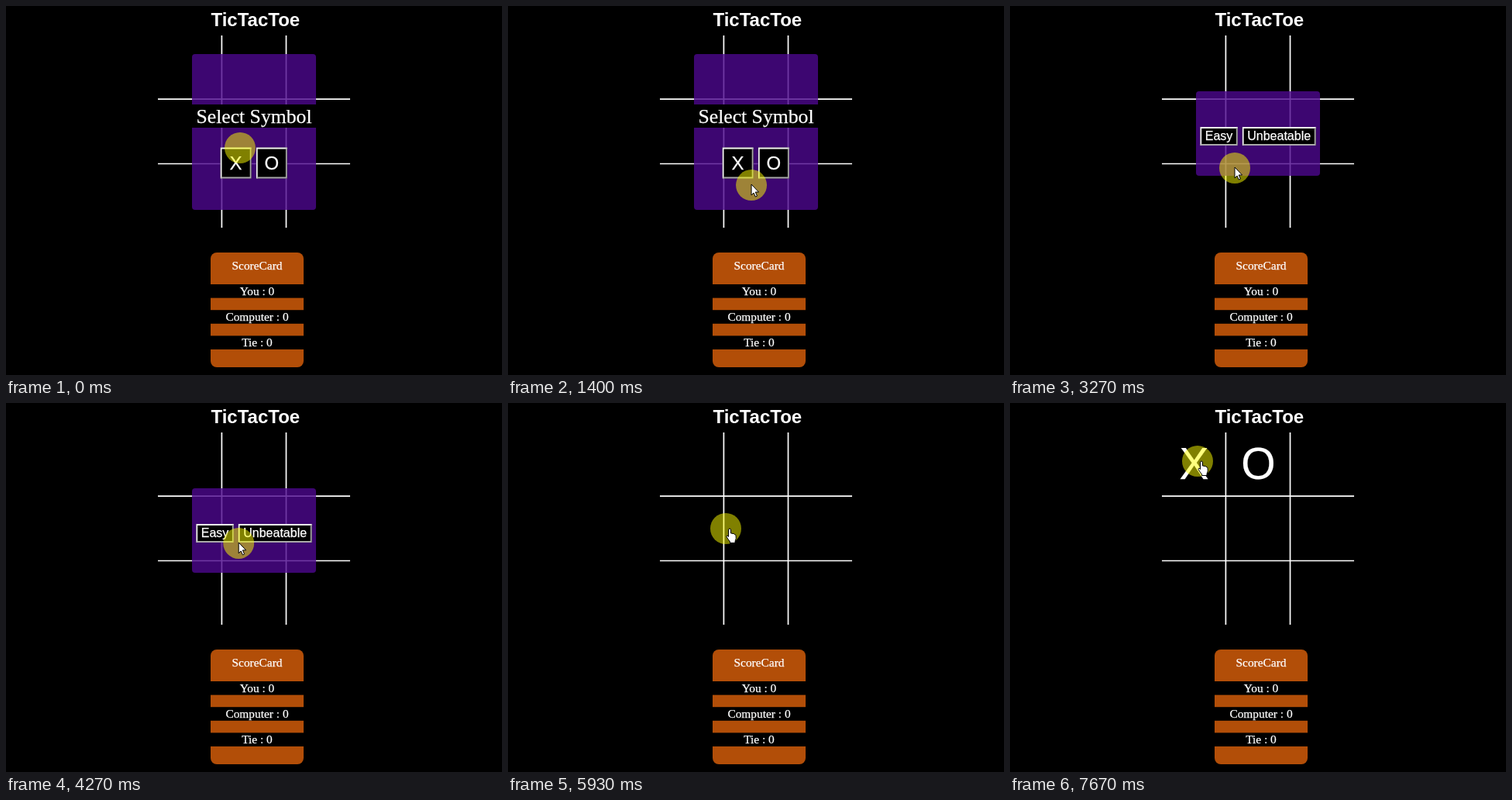
An HTML page for the animation above (8 s loop, 640 by 476 pixels).

```html
<!DOCTYPE html>
<html lang="en">
<head>
<meta charset="utf-8">
<title>TicTacToe</title>
<style>
  html, body { margin: 0; width: 100%; height: 100%; overflow: hidden; background: #000; }
  svg { display: block; width: 640px; height: 476px; }
  text { fill: #fff; stroke: #fff; stroke-width: .25; text-anchor: middle; font-family: "Liberation Sans", Arial, sans-serif; }
  .title { font-size: 24px; font-weight: bold; stroke: none; }
  .serif { font-family: "Liberation Serif", "Times New Roman", serif; }
  .panel { fill: rgba(77, 8, 142, .8); }
  .bevel { fill: none; stroke-width: 1.8; }
  .cursor { fill: #fff; stroke: #000; stroke-linejoin: round; }
  #marks { font-size: 57px; }
  #score { font-size: 15.4px; }
</style>
</head>
<body>
<svg viewBox="0 0 640 476">
  <rect width="640" height="476"/>
  <text class="title" x="321.8" y="26">TicTacToe</text>
  <path d="M278.4 38V286M361.5 38V286M196 120.2H444M196 203.5H444" stroke="#fff" stroke-width="1.7"/>
  <g id="marks">
    <text x="237.5" y="98">X</text>
    <text x="320.5" y="98">O</text>
  </g>
  <g id="symbolPanel">
    <rect class="panel" x="240" y="62" width="160" height="201" rx="4"/>
    <rect x="240" y="127" width="160" height="30"/>
    <text class="serif" x="320" y="151" font-size="25.7">Select Symbol</text>
  </g>
  <g id="levelPanel">
    <rect class="panel" x="240" y="110" width="160" height="109" rx="4"/>
  </g>
  <g id="score">
    <rect x="264" y="318" width="120" height="148" rx="8" fill="#b24e08"/>
    <text class="serif" x="324" y="340">ScoreCard</text>
  </g>
  <g id="pointer">
    <circle r="20" fill="#ff0" fill-opacity=".5"/>
    <path id="arrow" class="cursor" d="M0-1V13L3 10 5.200 15 7.400 14 5.200 9H9.500Z"/>
    <path id="hand" class="cursor" d="M3.500 2Q3.500 0 5 0T6.500 2V6Q11 6 13 8.500Q14 13 12 16.500V18.500H5.500V17Q3 14 1 10.500Q1 9 2.200 9L3.500 10.500Z"/>
  </g>
</svg>
<script>
const LOOP = 8000, TICK = 1000 / 15;
const LEVEL_AT = 3060, PLAY_AT = 5860, MARK_AT = 7460;
const el = id => document.getElementById(id);
const add = (id, markup) => el(id).insertAdjacentHTML('beforeend', markup);
const show = (id, on) => el(id).setAttribute('visibility', on ? 'visible' : 'hidden');

const symbolButton = { panel: 'symbolPanel', y: 182.5, w: 40, h: 40, size: 24, baseline: 211 };
const levelButton = { panel: 'levelPanel', y: 156, h: 24, size: 16, baseline: 173 };
const buttons = [
  { ...symbolButton, label: 'X', x: 276.6 },
  { ...symbolButton, label: 'O', x: 322.8 },
  { ...levelButton, label: 'Easy', x: 245.3, w: 48.5 },
  { ...levelButton, label: 'Unbeatable', x: 299.7, w: 95 }
];

for (const { panel, label, x, y, w, h, size, baseline } of buttons) {
  add(panel, `<rect x="${x}" y="${y}" width="${w}" height="${h}"/>
    <path class="bevel" d="M${x + 1} ${y + h}v${1 - h}h${w - 1}" stroke="#f4f4f4"/>
    <path class="bevel" d="M${x + 1} ${y + h - 1}h${w - 2}v${2 - h}" stroke="#aaa"/>
    <text x="${x + w / 2}" y="${baseline}" font-size="${size}">${label}</text>`);
}

['You', 'Computer', 'Tie'].forEach((name, i) => {
  const y = 359 + i * 33.2;
  add('score', `<rect x="264" y="${y}" width="120" height="17.600"/>
    <text class="serif" x="324" y="${y + 14}">${name} : 0</text>`);
});

// Mouse strokes, each starting where the previous one ended.
const home = [302, 183];
const strokes = [
  { start: 0, end: 867, to: [322, 226] },
  { start: 1133, end: 1867, to: [290, 209], bend: [329, 249] },
  { start: 4200, end: 4733, to: [299, 129], bend: [317, 143] },
  { start: 4800, end: 5533, to: [281, 162], bend: [285, 145] },
  { start: 6533, end: 6733, to: [299, 64] },
  { start: 6733, end: 7000, to: [242, 75] }
];

const easeOut = k => 1 - (1 - k) ** 2;

function position(t) {
  let at = home;
  for (const { start, end, to, bend } of strokes) {
    if (t < start) break;
    const k = easeOut(Math.min(1, (t - start) / (end - start)));
    at = at.map((from, i) => {
      const mid = bend ? bend[i] : (from + to[i]) / 2;
      return (1 - k) ** 2 * from + 2 * k * (1 - k) * mid + k * k * to[i];
    });
  }
  return at;
}

const isOver = (b, [x, y]) => x > b.x && x < b.x + b.w && y > b.y && y < b.y + b.h;

function draw(now) {
  const t = Math.floor(((now % LOOP) + 4) / TICK) * TICK % LOOP;
  const panel = t < LEVEL_AT ? 'symbolPanel' : t < PLAY_AT ? 'levelPanel' : null;
  const at = position(t);
  const clickable = !panel || buttons.some(b => b.panel === panel && isOver(b, at));
  show('symbolPanel', panel === 'symbolPanel');
  show('levelPanel', panel === 'levelPanel');
  show('marks', t >= MARK_AT);
  show('arrow', t > 0 && !clickable);
  show('hand', t > 0 && clickable);
  el('pointer').setAttribute('transform', `translate(${at})`);
}

const start = performance.now();
function frame() {
  draw(performance.now() - start);
  requestAnimationFrame(frame);
}
frame();
</script>
</body>
</html>
```
